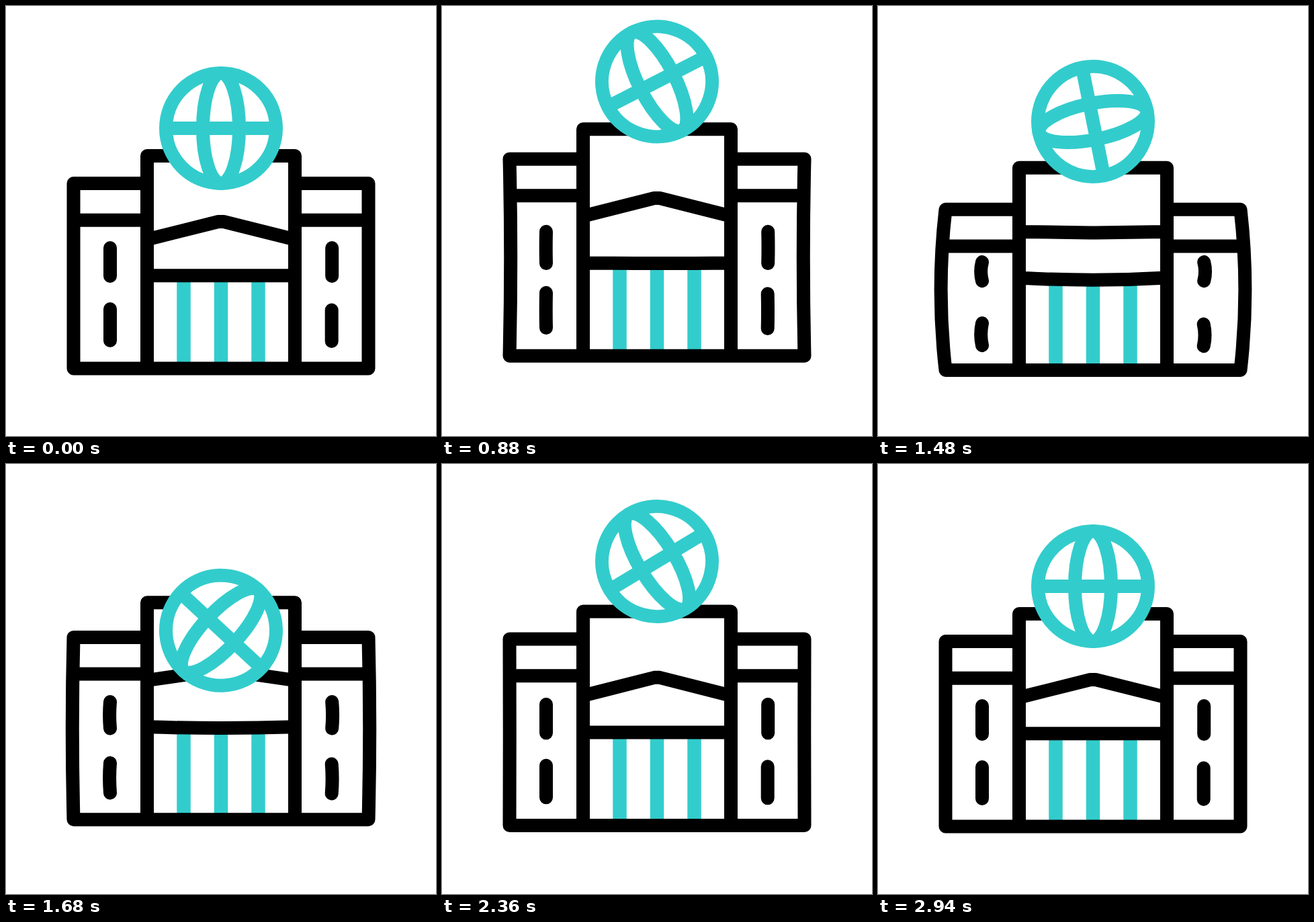
Write an HTML page that moves like this. It is 640 px wide and 640 px high and loops after 3.6 s.

```html
<!DOCTYPE html>
<html lang="en">
<head>
<meta charset="utf-8">
<title>Bouncing globe</title>
<style>
  html, body { margin: 0; width: 100%; height: 100%; overflow: hidden; background: #fff; }
  svg { display: block; width: 100%; height: 100%; }
  path, circle, ellipse { fill: none; stroke-width: 20; stroke-linejoin: round; }
  .ink { stroke: #000; }
  .teal { stroke: #33cccc; }
  .round { stroke-linecap: round; }
</style>
</head>
<body>
<svg viewBox="0 0 640 640">
  <path id="columns" class="teal" style="stroke-width:20.5"/>
  <path id="walls" class="ink"/>
  <path id="windows" class="ink round"/>
  <g id="globe">
    <circle class="teal" r="82" style="fill:#fff"/>
    <ellipse class="teal" rx="27" ry="82"/>
    <path class="teal" d="M-82 0H82"/>
  </g>
</svg>
<script>
const LOOP = 3600;
const el = id => document.getElementById(id);

const linear = u => u;
const smooth = u => u * u * (3 - 2 * u);
const fall = u => u ** 2.35;
const rise = u => 1 - fall(1 - u);
const windUp = u => u ** 1.3;

// Each key is [time, value, easing used to get there].
const timeline = (...keys) => t => {
  if (t <= keys[0][0]) return keys[0][1];
  const i = keys.findIndex(k => t < k[0]);
  if (i < 0) return keys[keys.length - 1][1];
  const [t0, v0] = keys[i - 1], [t1, v1, ease = smooth] = keys[i];
  return v0 + (v1 - v0) * ease((t - t0) / (t1 - t0));
};

// The building stretches, squashes, stretches again and settles.
const stretch = timeline([220, 0], [720, 1], [1380, 0], [1950, 1], [2440, 0]);
const squash = timeline([720, 0], [1380, 1], [1950, 0]);

const globeY = timeline([620, 182], [980, 109, rise], [1765, 290, fall], [2300, 144, rise], [2930, 182]);
const globeTurn = timeline([580, 0], [980, -36, linear], [1900, -180, windUp],
  [2360, -211, linear], [2930, -360]);

function draw(t) {
  const up = stretch(t), down = squash(t);
  const shift = (whenStretched, whenSquashed) => whenStretched * up + whenSquashed * down;

  const roof = 223 + shift(-51, 24), wing = 264 + shift(-51, 47), floor = 539.5 + shift(-23, 4.7);
  const shelf = wing + 54.7, lintel = floor - 138.3 + down;
  const peak = 321 + shift(-45, 22), eave = 346.5 + shift(-39.5, -8);
  const paneTop = shift(-33, 26), paneEnd = shift(-24, 10);

  const bend = shift(3.4, -7.8), sag = 7 * down;
  const mid = (wing + floor) / 2;
  const u = (shelf - wing) / (floor - wing), inset = 4 * bend * u * (1 - u);

  el('walls').setAttribute('d', `
    M210 ${wing}H100.5Q${100.5 + 2 * bend} ${mid} 100.5 ${floor}H539.5
    Q${539.5 - 2 * bend} ${mid} 539.5 ${wing}H430
    M${100.5 + inset} ${shelf}H210M430 ${shelf}H${539.5 - inset}
    M210 ${floor}V${roof}H430V${floor}
    M214 ${eave}L316 ${peak}H324L426 ${eave}
    M210 ${lintel}Q320 ${lintel + sag} 430 ${lintel}`);

  el('columns').setAttribute('d',
    [264.5, 320, 375.5].map(x => `M${x} ${lintel}V${floor}`).join(''));

  const pane = (x, y0, y1, bow) => {
    const a = y0 + paneTop, b = y1 + paneEnd;
    return `M${x} ${a}Q${x + bow} ${(a + b) / 2} ${x} ${b}`;
  };
  const bow = 4 * down;
  el('windows').setAttribute('d',
    pane(155, 360, 402, -bow) + pane(155, 451, 498, -bow) +
    pane(485.2, 360, 402, bow) + pane(484.7, 452.5, 499, bow));

  el('globe').setAttribute('transform', `translate(320 ${globeY(t)}) rotate(${globeTurn(t)})`);
}

const start = performance.now();
function tick() {
  draw((performance.now() - start) % LOOP);
  requestAnimationFrame(tick);
}
tick();
</script>
</body>
</html>
```
